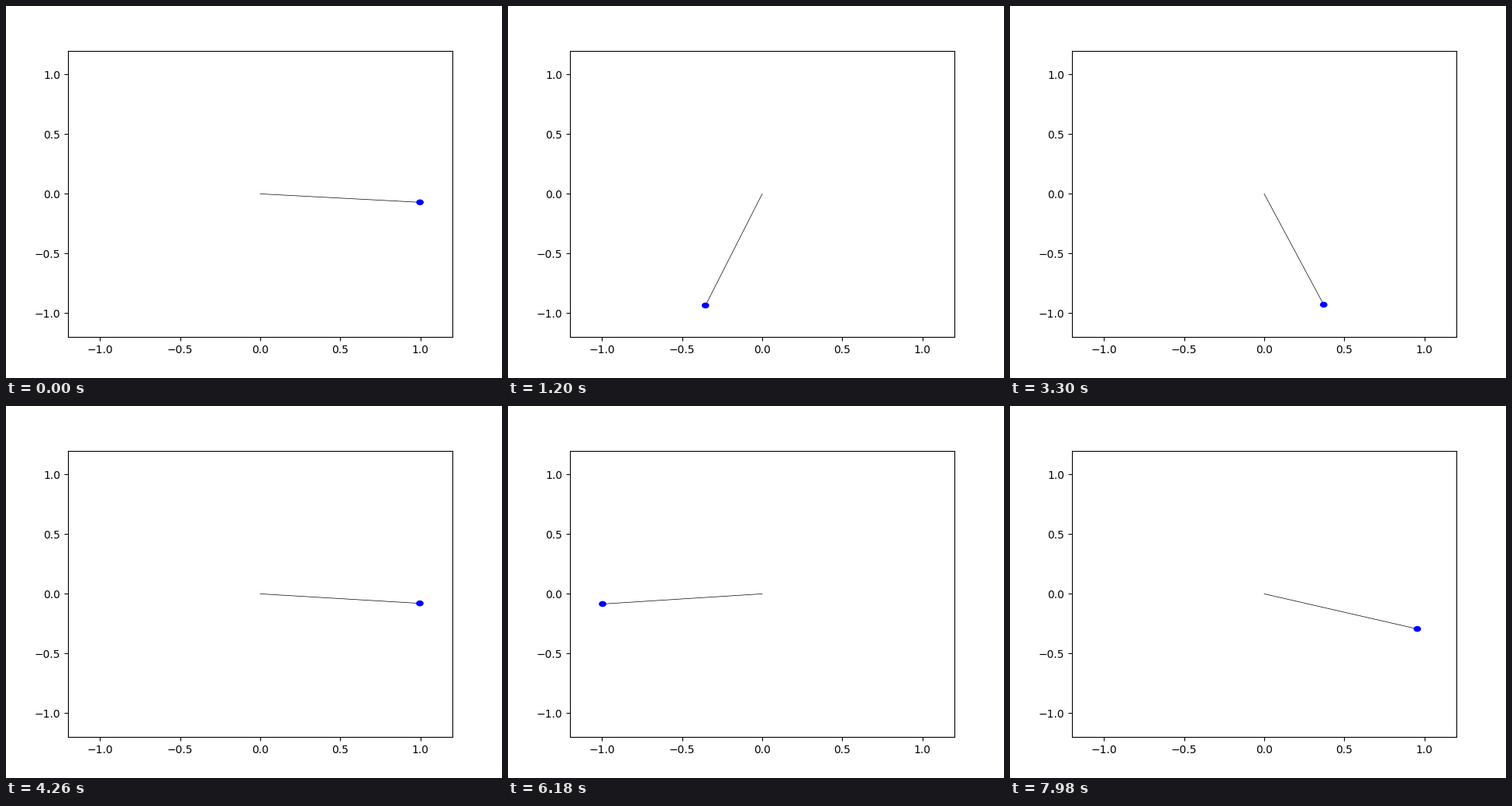
Write a matplotlib script that moves like this. It is 640 px wide and 480 px high and loops after 8000 ms.

```python
import math

import matplotlib.pyplot as plt
from matplotlib.animation import FuncAnimation

GRAVITY = 9.8
LENGTH = 1.0
START_ANGLE = 1.5
STEP = 10 / 299      # simulated seconds per pose
HOLD = 3             # ticks each pose stays on screen
TICKS = 400
TICK_MS = 20
SUBSTEPS = 20


def accel(theta):
    return -GRAVITY / LENGTH * math.sin(theta)


def rk4(theta, omega, dt):
    k1, a1 = omega, accel(theta)
    k2, a2 = omega + a1 * dt / 2, accel(theta + k1 * dt / 2)
    k3, a3 = omega + a2 * dt / 2, accel(theta + k2 * dt / 2)
    k4, a4 = omega + a3 * dt, accel(theta + k3 * dt)
    return (theta + dt * (k1 + 2 * k2 + 2 * k3 + k4) / 6,
            omega + dt * (a1 + 2 * a2 + 2 * a3 + a4) / 6)


def swing(count):
    theta, omega = START_ANGLE, 0.0
    angles = []
    for _ in range(count):
        angles.append(theta)
        for _ in range(SUBSTEPS):
            theta, omega = rk4(theta, omega, STEP / SUBSTEPS)
    return angles


angles = swing(math.ceil(TICKS / HOLD))

fig, ax = plt.subplots(figsize=(6.4, 4.8), dpi=100)
ax.set_xlim(-1.2, 1.2)
ax.set_ylim(-1.2, 1.2)
rod, = ax.plot([], [], color="black", lw=0.5)
bob = ax.add_patch(plt.Circle((0, 0), 0.02, color="blue", lw=1, zorder=3))


def draw(tick):
    theta = angles[tick // HOLD]
    x, y = LENGTH * math.sin(theta), -LENGTH * math.cos(theta)
    rod.set_data([0, x], [0, y])
    bob.center = x, y
    return rod, bob


anim = FuncAnimation(fig, draw, frames=TICKS, interval=TICK_MS,
                     init_func=lambda: draw(0), repeat=True, repeat_delay=0)
plt.show()
```
